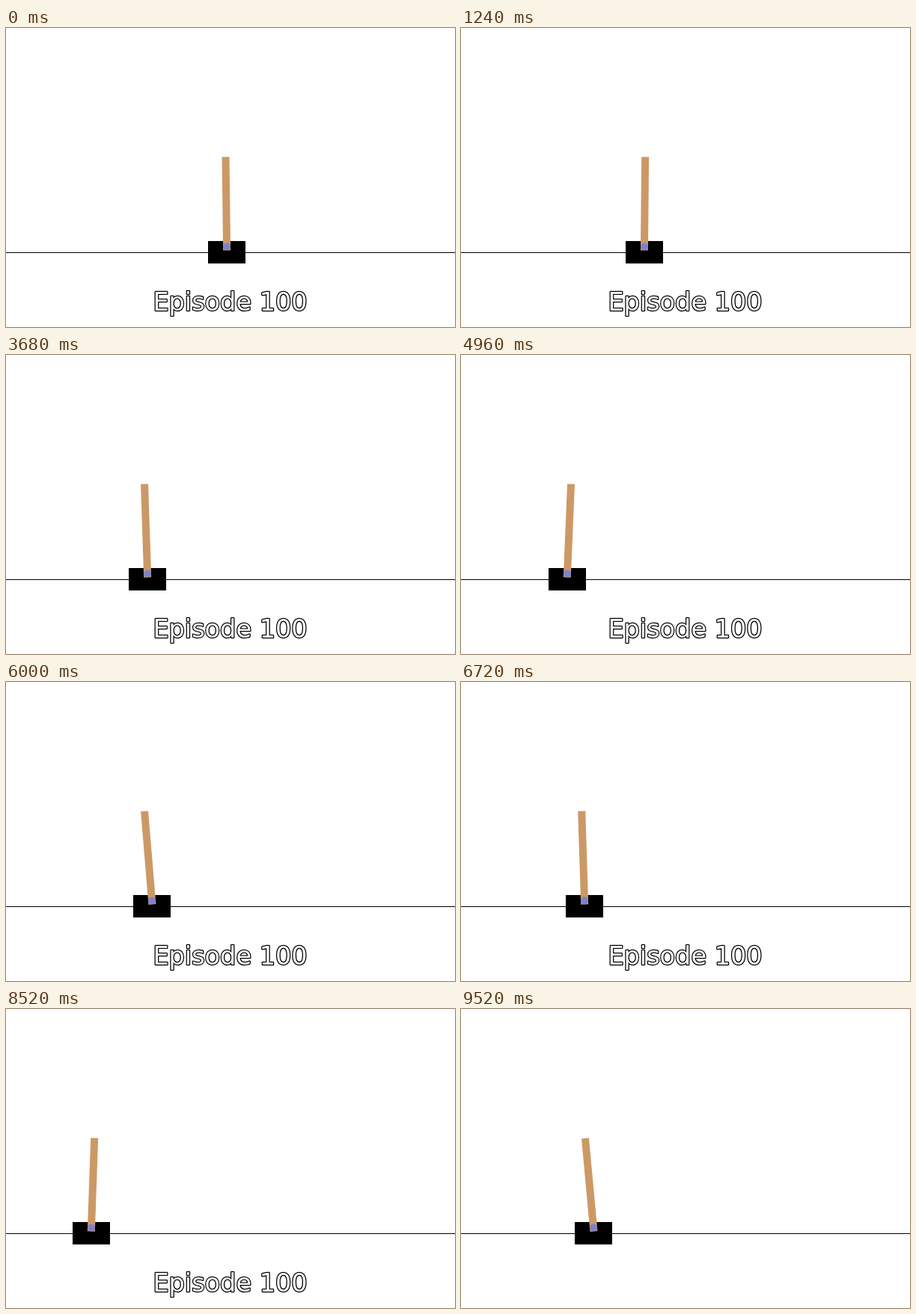
An HTML page with a canvas that plays this animation: 600 px wide and 400 px high, repeating every 9560 ms.

```html
<!DOCTYPE html>
<html lang="en">
<head>
<meta charset="utf-8">
<title>Cart and pole</title>
<style>
  html, body { margin: 0; width: 100%; height: 100%; overflow: hidden; background: #fff; }
  canvas { display: block; }
</style>
</head>
<body>
<canvas id="stage" width="600" height="400"></canvas>
<script>
const ctx = document.getElementById('stage').getContext('2d');
const LOOP = 9560, STEP = 40;
const LABEL_END = 9520;
const AXLE_Y = 292.5;

// Key poses: time in ms, cart centre in px, pole lean in radians (right is positive)
const poses = [
  [0, 295, -0.012],
  [320, 300, -0.09],
  [1240, 245, 0.01],
  [2040, 187, 0.08],
  [2880, 229, -0.08],
  [3680, 189, -0.033],
  [4560, 119, 0.08],
  [4960, 142, 0.042],
  [6000, 195, -0.083],
  [7440, 115, 0.05],
  [7840, 92, 0.08],
  [9520, 177, -0.092]
];

// Monotone cubic curve through one column of the poses
function curve(col) {
  const last = poses.length - 1;
  const slope = i => (poses[i + 1][col] - poses[i][col]) / (poses[i + 1][0] - poses[i][0]);
  const tangent = i => {
    if (i === 0) return 0;
    if (i === last) return slope(last - 1);
    const a = slope(i - 1), b = slope(i);
    return a * b > 0 ? 2 * a * b / (a + b) : 0;
  };
  return t => {
    let i = 0;
    while (i < last - 1 && t >= poses[i + 1][0]) i++;
    const p = poses[i], q = poses[i + 1];
    const h = q[0] - p[0], u = (t - p[0]) / h, w = 1 - u;
    return p[col] * (1 + 2 * u) * w * w + q[col] * u * u * (3 - 2 * u)
      + h * u * w * (tangent(i) * w - tangent(i + 1) * u);
  };
}

const cartAt = curve(1);
const leanAt = curve(2);

function drawCart(x, lean) {
  ctx.fillStyle = '#000';
  ctx.fillRect(x - 25, 285, 50, 30);
  ctx.save();
  ctx.translate(x, AXLE_Y);
  ctx.rotate(lean);
  ctx.fillStyle = '#cc9966';
  ctx.fillRect(-5, -120, 10, 125);
  ctx.fillStyle = '#8080cc';
  ctx.beginPath();
  ctx.arc(0, 0, 5, 0, Math.PI * 2);
  ctx.fill();
  ctx.restore();
}

function drawLabel() {
  ctx.font = '33.5px "DejaVu Sans", sans-serif';
  ctx.textAlign = 'center';
  ctx.lineJoin = 'round';
  ctx.lineWidth = 2.5;
  ctx.strokeStyle = '#000';
  ctx.strokeText('Episode 100', 299.5, 378);
  ctx.fillStyle = '#fff';
  ctx.fillText('Episode 100', 299.5, 378);
}

function draw(now) {
  const t = Math.floor((now % LOOP) / STEP) * STEP;
  ctx.fillStyle = '#fff';
  ctx.fillRect(0, 0, 600, 400);
  ctx.fillStyle = '#000';
  ctx.fillRect(0, 300, 600, 1);
  drawCart(Math.round(cartAt(t)), leanAt(t));
  if (t < LABEL_END) drawLabel();
}

const start = performance.now();
function tick() {
  draw(performance.now() - start);
  requestAnimationFrame(tick);
}
tick();
</script>
</body>
</html>
```
